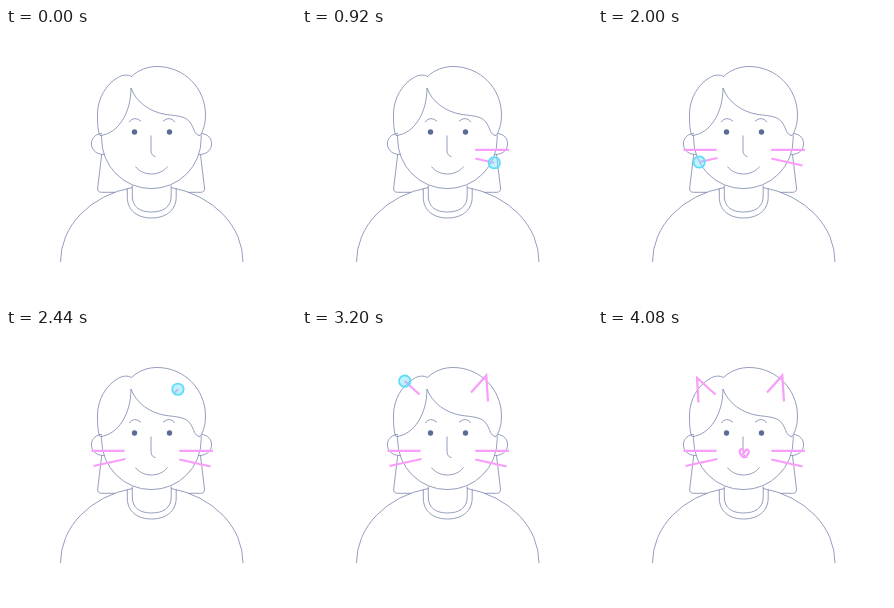
An HTML page without scripts that plays this animation: 290x273 px, repeating every 4240 ms.

```html
<!DOCTYPE html>
<html lang="en">
<head>
<meta charset="utf-8">
<title>Doodled cat face</title>
<style>
  @property --p { syntax: "<number>"; inherits: true; initial-value: -1; }

  html, body { margin: 0; width: 100%; height: 100%; overflow: hidden; background: #fff; }
  svg { display: block; width: 100%; height: 100%; }

  .portrait { fill: none; stroke: #7a86ac; stroke-width: .8; stroke-linejoin: round; }
  .eyes { fill: #586c96; stroke: none; }

  /* --p is the drawn share of a stroke; the pen shows from --from and fades out towards --to */
  .stroke { animation: 4240ms step-end infinite; }
  .stroke path {
    d: var(--d);
    fill: none;
    stroke: #f99dfa;
    stroke-width: 2.2;
    stroke-dasharray: 100 200;
    stroke-dashoffset: calc(100.01px - 100px * clamp(0, var(--p), 1));
  }
  .stroke circle {
    fill: #6fe0fa70;
    stroke: #62dcf9;
    stroke-width: 1.8;
    opacity: calc(min((var(--p) + .9) * 99, (var(--to) - var(--p)) * 3));
    offset-path: var(--d);
    offset-distance: calc(100% * clamp(0, var(--p), 1));
    offset-rotate: 0deg;
  }
  .stroke .tap { offset-path: none; }

  .right-top    { --d: path("M173.3 121.8H207"); --from: 0; --to: 1; animation-name: right-top; }
  .right-bottom { --d: path("M173.3 130.5L204.5 137.5"); --from: .02; --to: 1.08; animation-name: right-bottom; }
  .left-top     { --d: path("M118.5 121.8H85.5"); --from: .18; --to: 1.14; animation-name: left-top; }
  .left-bottom  { --d: path("M119.5 130L87.5 137"); --from: .14; --to: 1.11; animation-name: left-bottom; }
  .right-ear    { --d: path("M169 63.5L184.3 46.5L186 72.5"); --from: .09; --to: 1.07; animation-name: right-ear; }
  .left-ear     { --d: path("M117.5 65.5L99 48.8L100.5 73.5"); --from: .1; --to: 1.1; animation-name: left-ear; }
  .nose         { --d: path("M145 126C146 122 149 119 150.5 121.5C152 124 148 128 146 128.5C143 127 140.5 122.5 142.5 120.5C144.5 119.5 146 121 146 123"); --from: .1; --to: 1.1; animation-name: nose; }

  @keyframes right-top {
    0% { --p: -1; }
    4.716% { --p: var(--from); animation-timing-function: steps(9); }
    13.207%, 100% { --p: var(--to); }
  }
  @keyframes right-bottom {
    0% { --p: -1; }
    16.98% { --p: var(--from); animation-timing-function: steps(9); }
    25.471%, 100% { --p: var(--to); }
  }
  @keyframes left-top {
    0% { --p: -1; }
    32.075% { --p: var(--from); animation-timing-function: steps(8); }
    39.622%, 100% { --p: var(--to); }
  }
  @keyframes left-bottom {
    0% { --p: -1; }
    43.396% { --p: var(--from); animation-timing-function: steps(9); }
    51.886%, 100% { --p: var(--to); }
  }
  @keyframes right-ear {
    0% { --p: -1; }
    57.546% { --p: var(--from); animation-timing-function: steps(9); }
    66.037%, 100% { --p: var(--to); }
  }
  @keyframes left-ear {
    0% { --p: -1; }
    72.641% { --p: var(--from); animation-timing-function: steps(10); }
    82.075%, 100% { --p: var(--to); }
  }
  @keyframes nose {
    0% { --p: -1; }
    88.679% { --p: var(--from); animation-timing-function: steps(8); }
    96.226%, 100% { --p: var(--to); }
  }
</style>
</head>
<body>
<svg viewBox="0 0 290 273">
  <g class="portrait">
    <!-- shoulders and collar -->
    <path d="M54.5 234A91.3 76 0 0 1 126.3 159.500M237 234A91.3 76 0 0 0 165.2 159.500"/>
    <path d="M121.3 160.500V169C121.3 183 132 190 145.500 190S170.2 183 170.2 169V160.500"/>
    <path d="M126.3 157.500V168C126.3 179 134 184 145.500 184S165.2 179 165.2 168V157.500"/>
    <!-- hair behind, ears, face -->
    <path d="M95.7 126.500L91.7 160Q91.2 164.300 95.7 164.300H109M194.500 126.500L198.500 160Q199 164.300 194.500 164.300H182"/>
    <path d="M96 105.500C81.500 106 81.500 127 98.500 126.500M195 105.500C209.500 106 209.500 127 192.500 126.500"/>
    <path d="M95.600 107V110.800A49.800 49.800 0 0 0 195.200 110.800V107"/>
    <!-- hair in front -->
    <path d="M125.500 48.500C122 46.500 117 46.500 112 49.500C100 56 91.500 71 91.500 86C91.500 97 92 104 94 107.500C112 106 125 85 125 60"/>
    <path d="M125.500 48.500C133 41.500 142 38.500 151 38.500C178 38.500 199.500 60 199.500 87C199.500 96 197 104 194 107.500C188 107 188.500 101 184.500 95C180 88 172 88 160 86.500C144 84 130 74 125 60"/>
    <!-- features -->
    <path d="M123 94Q128.500 87.500 135 93.300M157 93.300Q163.500 87.500 169 94"/>
    <path d="M145 107.500V122Q145 128 149.500 128.500M129.500 138.500C137 148.500 154 148.500 161.500 138.500"/>
    <g class="eyes"><circle cx="128.500" cy="104" r="2.700"/><circle cx="163.500" cy="104" r="2.700"/></g>
  </g>

  <g class="stroke right-top"><path pathLength="100"/><circle r="5.700"/></g>
  <g class="stroke right-bottom"><path pathLength="100"/><circle r="5.700"/></g>
  <g class="stroke left-top"><path pathLength="100"/><circle r="5.700"/></g>
  <g class="stroke left-bottom"><path pathLength="100"/><circle r="5.700"/></g>
  <g class="stroke right-ear"><path pathLength="100"/><circle r="5.700"/></g>
  <g class="stroke left-ear"><path pathLength="100"/><circle r="5.700"/></g>
  <g class="stroke nose"><path pathLength="100"/><circle class="tap" cx="145.500" cy="124" r="5.700"/></g>
</svg>
</body>
</html>
```
